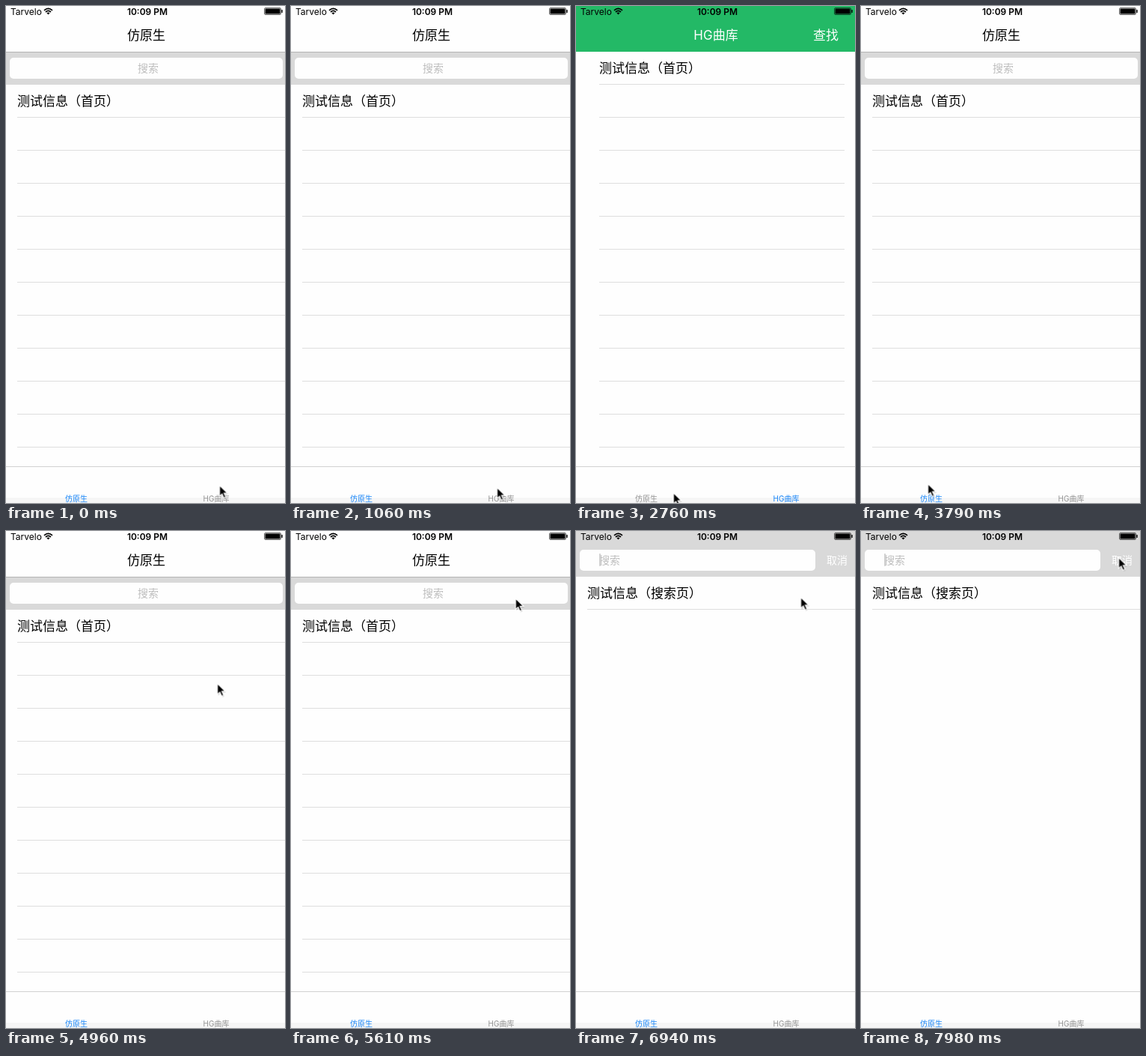
Animation, 373 px wide and 663 px high, one loop 8 s. Source, as an HTML page:

```html
<!DOCTYPE html>
<html lang="zh-CN">
<head>
<meta charset="utf-8">
<title>仿原生</title>
<style>
  html, body { margin: 0; width: 100%; height: 100%; overflow: hidden; background: #fefefe; }
  svg { display: block; width: 100vw; height: 100vh; }
  text { font-family: Inter, "Noto Sans CJK SC", "Noto Sans CJK", sans-serif; font-size: 17px; }
  .mid { text-anchor: middle; }
  .hint { font-size: 14px; fill: #bdbdbd; }
  .tab { font-size: 10px; text-anchor: middle; }
  .status { font-size: 12px; }
  .rule { fill: none; stroke: #dedede; }
</style>
</head>
<body>
<svg viewBox="0 0 373 663" preserveAspectRatio="none">
  <rect width="373" height="663" fill="#fefefe"/>

  <g id="home">
    <text class="mid" x="187.5" y="45">仿原生</text>
    <rect y="61" width="373" height="44" fill="#d9d9d9"/>
    <path d="M0 61.5H373" stroke="#b4b4b4"/>
    <rect x="5" y="69" width="365" height="28" rx="5" fill="#fefefe"/>
    <text class="mid hint" x="190" y="88">搜索</text>
    <text x="15" y="132.5">测试信息（首页）</text>
    <path class="rule" id="homeRules"/>
  </g>

  <g id="music">
    <rect width="373" height="61" fill="#23b966"/>
    <g fill="#fff">
      <text class="mid" x="187" y="45">HG曲库</text>
      <text x="317" y="45">查找</text>
    </g>
    <text x="31" y="88.5">测试信息（首页）</text>
    <path class="rule" id="musicRules"/>
  </g>

  <g id="search">
    <rect id="shade" width="373" height="61" fill="#d9d9d9"/>
    <g id="oldTitle">
      <path d="M0 61.5H373" stroke="#cfcfcf"/>
      <text class="mid" x="187.5" y="45">仿原生</text>
    </g>
    <g id="field">
      <rect x="5" y="25" width="315" height="28" rx="5" fill="#fefefe"/>
      <text class="hint" x="31" y="44">搜索</text>
      <text x="335" y="44" fill="#fff" style="font-size:14px">取消</text>
      <rect id="caret" x="31" y="30" width="2" height="17" rx="1" fill="#d0d0d0"/>
    </g>
    <text x="15" y="88.5">测试信息（搜索页）</text>
    <path class="rule" d="M15 104.5H373"/>
  </g>

  <rect y="656" width="373" height="7" fill="#f6f6f6"/>
  <path d="M0 614.5H373" stroke="#d2d2d2"/>
  <text class="tab" id="tabHome" x="94" y="660.5">仿原生</text>
  <text class="tab" id="tabMusic" x="281" y="660.5">HG曲库</text>

  <text class="status" x="6" y="11.5">Tarvelo</text>
  <g fill="none" stroke="#000" stroke-width="1.7">
    <path d="M51 5.8Q56.5 .8 62 5.8M53 8Q56.5 4.8 60 8"/>
    <path d="M54.4 9.2Q56.5 7.6 58.6 9.2L56.5 11.4Z" fill="#000" stroke="none"/>
  </g>
  <text class="status mid" x="189" y="11.5" font-weight="600">10:09 PM</text>
  <rect x="345.5" y="2.5" width="22" height="9" rx="1.5" fill="none" stroke="#000" stroke-opacity=".6"/>
  <rect x="346.5" y="3.5" width="20" height="7" rx=".5"/>
  <rect x="368.3" y="5" width="1.4" height="4" rx=".6"/>

  <g id="pointer">
    <path d="M0 0V14.5L3.4 11.4 5.8 16.8 8.4 15.6 6 10.4H10.6Z" transform="translate(1 1.5)" fill="#000" opacity=".18"/>
    <path d="M0 0V14.5L3.4 11.4 5.8 16.8 8.4 15.6 6 10.4H10.6Z" stroke="#fff" stroke-width="1.2"/>
  </g>
</svg>
<script>
const LOOP = 8000;
const $ = id => document.getElementById(id);

// steps: [ms, value, easing towards the next step]
function track(id, prop, steps, defaultEasing = 'step-end') {
  const all = [...steps, [LOOP, steps[steps.length - 1][1]]];
  $(id).animate(
    all.map(([ms, value, easing = defaultEasing]) => ({ offset: ms / LOOP, [prop]: value, easing })),
    { duration: LOOP, iterations: Infinity }
  );
}

function rules(id, left, right, top) {
  let d = '';
  for (let y = top; y < 600; y += 44) d += `M${left} ${y + .5}H${right}`;
  $(id).setAttribute('d', d);
}

rules('homeRules', 15, 373, 148);
rules('musicRules', 31, 359, 104);

const BLUE = '#1583f7', GRAY = '#929292';
const OPEN_MUSIC = 1560, BACK_HOME = 3790, OPEN_SEARCH = 6390;

track('home', 'opacity', [[0, 1], [OPEN_MUSIC, 0], [BACK_HOME, 1], [OPEN_SEARCH, 0]]);
track('music', 'opacity', [[0, 0], [OPEN_MUSIC, 1], [BACK_HOME, 0]]);
track('search', 'opacity', [[0, 0], [OPEN_SEARCH, 1]]);
track('tabHome', 'fill', [[0, BLUE], [OPEN_MUSIC, GRAY], [BACK_HOME, BLUE]]);
track('tabMusic', 'fill', [[0, GRAY], [OPEN_MUSIC, BLUE], [BACK_HOME, GRAY]]);

track('shade', 'opacity', [[0, .28], [6440, .28], [6720, 1]], 'linear');
track('oldTitle', 'opacity', [[0, 1], [6440, 1], [6660, 0]], 'linear');
track('field', 'opacity', [[0, 0], [6440, 0], [6720, 1]], 'linear');
track('caret', 'opacity', [[0, 1], [7300, 1], [7480, 0], [7850, 0], [7980, 1]], 'linear');

const at = (x, y) => `translate(${x}px, ${y}px)`;
track('pointer', 'transform', [
  [0, at(285.5, 639.5)],
  [430, at(285.5, 639.5), 'ease-in-out'],
  [1060, at(275.5, 642.5)],
  [2290, at(275.5, 642.5), 'ease-in'],
  [2760, at(130.5, 649.5), 'ease-out'],
  [3150, at(82, 642)],
  [3280, at(82, 642), 'ease-in-out'],
  [3440, at(89.5, 637.5)],
  [4400, at(89.5, 637.5), 'ease-in-out'],
  [4730, at(279, 221)],
  [4910, at(279, 221)],
  [4960, at(282.5, 203.5), 'ease-in-out'],
  [5670, at(300.5, 88.5)],
  [7180, at(300.5, 88.5), 'ease-in-out'],
  [7800, at(344.5, 35.5)]
], 'linear');
</script>
</body>
</html>
```
